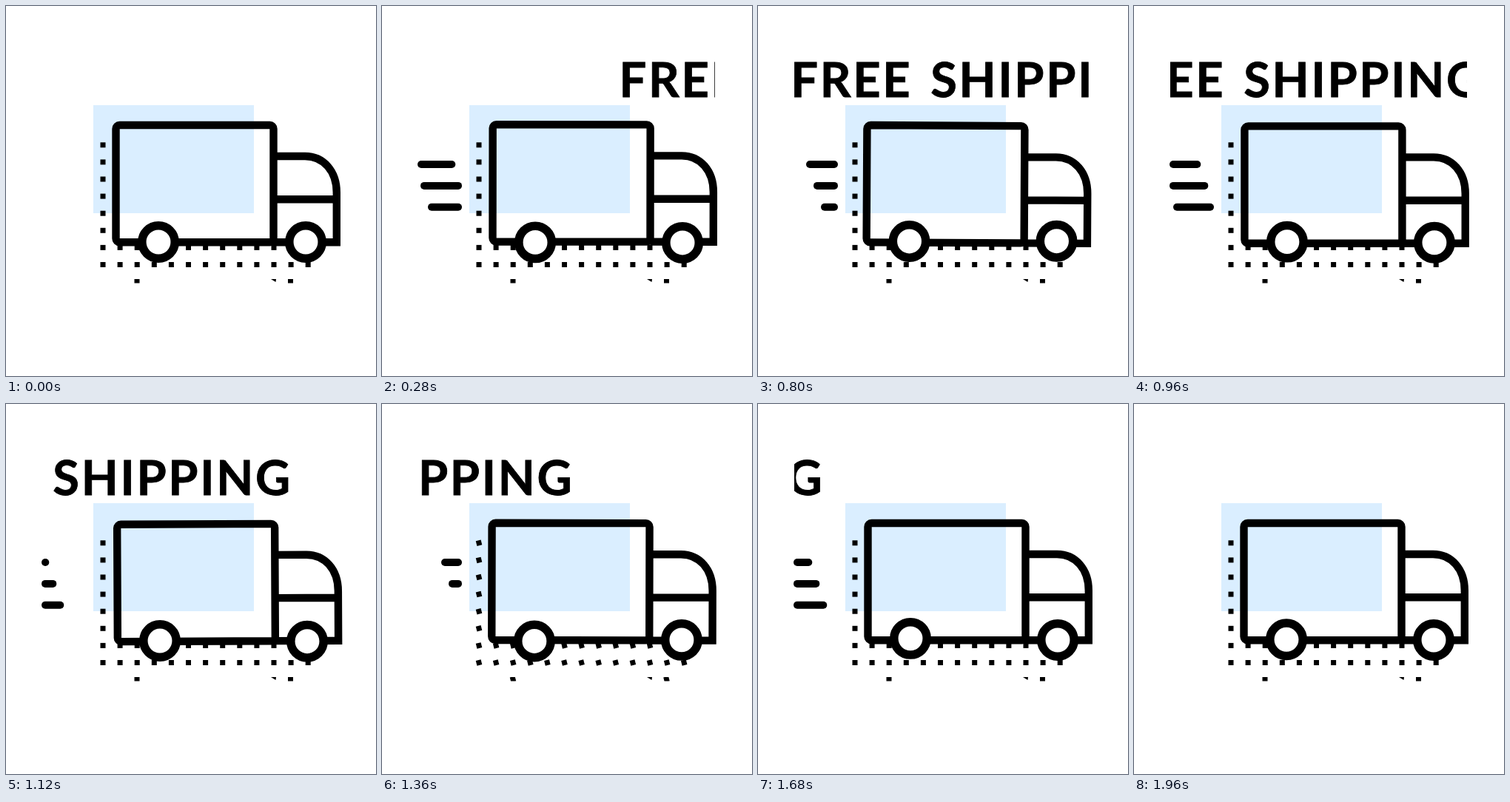
An HTML page with a canvas that plays this animation: 500 by 500 pixels, repeating every 2 s.

```html
<!DOCTYPE html>
<html lang="en">
<head>
<meta charset="utf-8">
<title>Free shipping</title>
<style>
html, body { margin: 0; width: 100%; height: 100%; overflow: hidden; background: #fff; }
canvas { display: block; width: 500px; height: 500px; }
</style>
</head>
<body>
<canvas id="stage" width="500" height="500"></canvas>
<script>
const ctx = document.getElementById('stage').getContext('2d');
const LOOP = 2000, STEP = 40, RIDE = 1680;
const DEG = Math.PI / 180;

const wave = (t, period) => Math.sin(2 * Math.PI * t / period);

// The body shakes most halfway through the ride and then rests.
function poseAt(t) {
  const swell = Math.max(0, Math.sin(Math.PI * t / RIDE));
  return {
    x: 2.3 * swell * wave(t, 900),
    y: -1.5 * swell * wave(t, 1360),
    tilt: 0.3 * swell * wave(t, 640),
    rear: 2.8 * t / LOOP * wave(t, 1000),
    front: 2 * swell * wave(t, 900)
  };
}

function dot(x, y, turn) {
  ctx.save();
  ctx.translate(x, y);
  ctx.rotate(turn * DEG);
  ctx.fillRect(-3.5, -3.5, 7, 7);
  ctx.restore();
}

function dots(t) {
  const gap = 23.1, x0 = 131, y0 = 187.8;
  const turn = -14 * Math.max(0, wave(t - 310, 840));
  ctx.fillStyle = '#000';
  for (let r = 0; r < 8; r++) dot(x0, y0 + r * gap, turn);
  for (let c = 1; c <= 12; c++) {
    if (c < 12) dot(x0 + c * gap, y0 + 6 * gap, turn);
    dot(x0 + c * gap, y0 + 7 * gap, turn);
  }
  // the lowest row is cut by the edge of the pattern
  ctx.save();
  ctx.beginPath();
  ctx.rect(120, 369, 300, 5.5);
  ctx.clip();
  dot(177, 372, turn);
  dot(384.5, 372, turn);
  ctx.beginPath();
  ctx.moveTo(358, 369);
  ctx.lineTo(365, 369);
  ctx.lineTo(364.5, 373);
  ctx.fill();
  ctx.restore();
}

function wheel(x, y) {
  ctx.beginPath();
  ctx.arc(x, y, 22.2, 0, 2 * Math.PI);
  ctx.fill();
  ctx.stroke();
}

function truck({ x, y, tilt, rear, front }) {
  ctx.strokeStyle = '#000';
  ctx.fillStyle = '#fff';
  ctx.lineWidth = 10.4;
  ctx.save();
  ctx.translate(298 + x, 240 + y);
  ctx.rotate(tilt * DEG);
  ctx.translate(-298, -240);
  ctx.beginPath();
  ctx.roundRect(148.5, 161, 213, 158.3, 5);
  ctx.moveTo(361.5, 203);
  ctx.lineTo(404, 203);
  ctx.bezierCurveTo(429, 203, 446.8, 223, 446.8, 252);
  ctx.lineTo(446.8, 319.3);
  ctx.lineTo(361.5, 319.3);
  ctx.moveTo(361.5, 261.3);
  ctx.lineTo(446.8, 261.3);
  ctx.stroke();
  ctx.restore();
  ctx.lineWidth = 11.5;
  wheel(206 + x, 319 + rear);
  wheel(405 + x, 319 + front);
}

// Each line grows to the left, then shrinks away at the left end.
function speedLines(t) {
  const cycle = Math.min(2, Math.floor(t / 635));
  const base = (t - cycle * 635) * 0.2;
  ctx.save();
  ctx.strokeStyle = '#000';
  ctx.lineWidth = 10;
  ctx.lineCap = 'round';
  for (let i = 0; i < 3; i++) {
    const d = base - i * 10, y = 214 + i * 28.9;
    const left = Math.max(53, 103 - d);
    const right = Math.min(103, 150.3 - d);
    if (d <= 0 || right < 53) continue;
    ctx.beginPath();
    ctx.moveTo(left, y);
    ctx.lineTo(right, y);
    ctx.stroke();
  }
  ctx.restore();
}

function word(text, x) {
  const ink = ctx.measureText(text).actualBoundingBoxLeft;
  ctx.fillText(text, x + ink, 122.5);
  ctx.strokeText(text, x + ink, 122.5);
}

function banner(t) {
  const x = 198 - (t - 520) * 0.5312;
  ctx.save();
  ctx.beginPath();
  ctx.rect(49, 60, 401, 74);
  ctx.clip();
  ctx.font = 'bold 65px Lato, sans-serif';
  ctx.letterSpacing = '2.7px';
  ctx.fillStyle = ctx.strokeStyle = '#000';
  ctx.lineWidth = 0.8;
  word('FREE', x);
  word('SHIPPING', x + 185);
  ctx.restore();
}

function draw() {
  const t = Math.floor(performance.now() % LOOP / STEP) * STEP;
  ctx.fillStyle = '#fff';
  ctx.fillRect(0, 0, 500, 500);
  ctx.fillStyle = '#daeeff';
  ctx.fillRect(118, 134, 217, 146);
  dots(t);
  truck(poseAt(t));
  speedLines(t);
  banner(t);
  requestAnimationFrame(draw);
}
draw();
</script>
</body>
</html>
```
